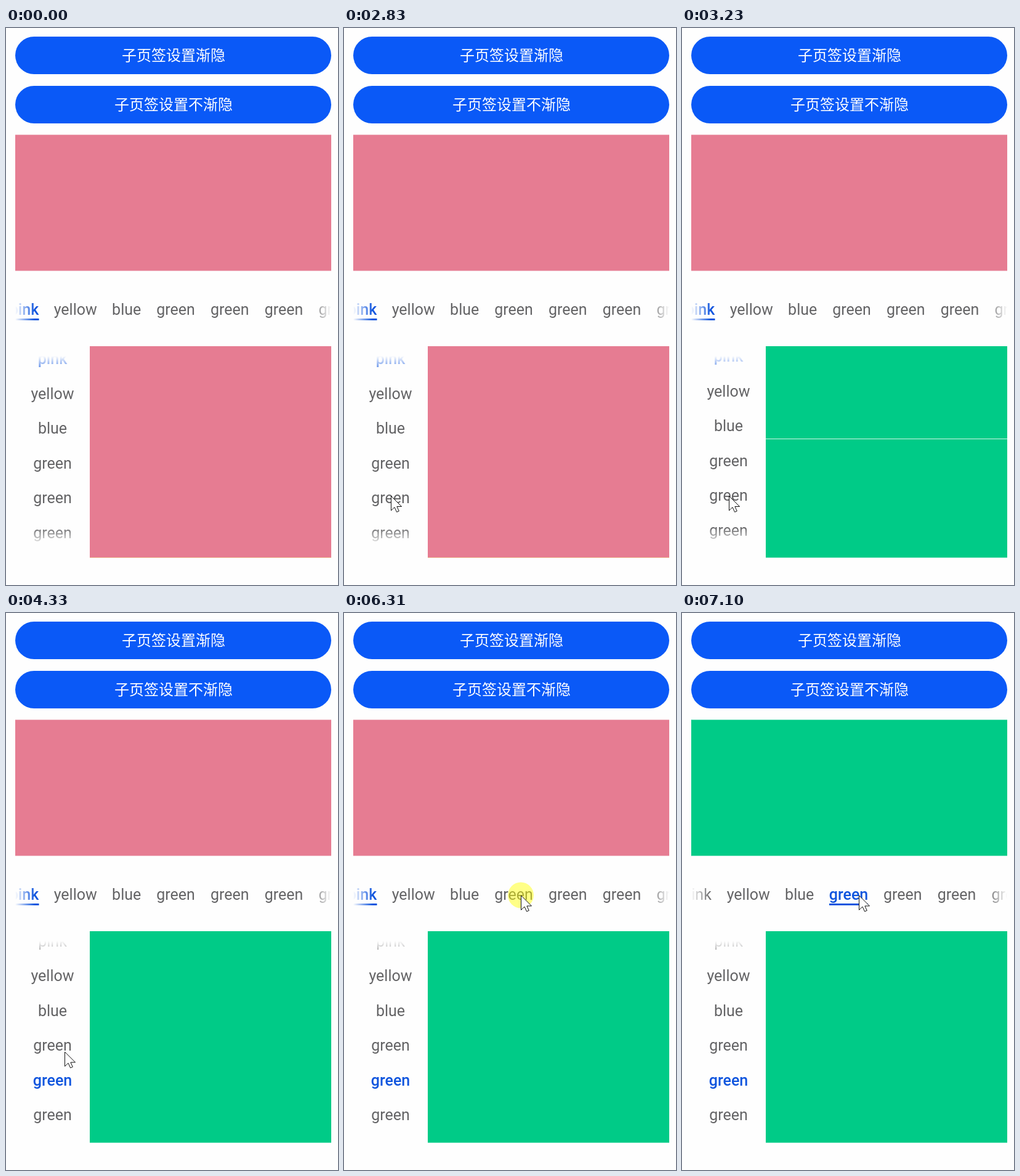
An HTML page with a canvas that plays this animation: 539x905 px, repeating every 8 s.

```html
<!DOCTYPE html>
<html lang="zh">
<head>
<meta charset="utf-8">
<title>Tabs fading edge</title>
<style>
  html, body { margin: 0; height: 100%; overflow: hidden; background: #fefefe; }
  canvas { display: block; width: 539px; height: 905px; }
</style>
</head>
<body>
<canvas id="stage"></canvas>
<script>
const W = 539, H = 905, LOOP = 8000;
const canvas = document.getElementById('stage');
const ctx = canvas.getContext('2d');
const dpr = window.devicePixelRatio || 1;
canvas.width = W * dpr;
canvas.height = H * dpr;

const BG = '#fefefe', GREY = '#646466', ACTIVE = '#0f55de', BUTTON = '#0a59f7';
const GREEN = '#00cb87';
const PAGES = ['#e67c92', '#ffbf00', '#007dff', GREEN, GREEN, GREEN];
const TABS = ['pink', 'yellow', 'blue', 'green', 'green', 'green', 'green'];
const TAB_CENTERS = [29.5, 112.7, 195.7, 275.5, 363.2, 451, 538.7];

// Swipe progress: [time, fraction], each value is held until the next one.
const SIDE_SWIPE = [[0, 0], [3080, 0.47], [3230, 0.89], [3320, 1]];
const TOP_SWIPE = [[0, 0], [6720, 0.567], [6780, 0.77], [7100, 1]];
const SIDE_SELECTED = 3470, TOP_SELECTED = 7100;

// Pointer moves in discrete steps along evenly timed points.
const MOVES = [
  { from: 190, to: 980, steps: 11, path: [[514, 810], [400, 670], [270, 530], [150, 440], [66, 490], [71, 601]] },
  { from: 1060, to: 1290, steps: 4, path: [[71, 618], [71, 651]] },
  { from: 1610, to: 1990, steps: 6, path: [[71, 657], [74, 715], [76, 760]] },
  { from: 4250, to: 5010, steps: 11, path: [[80, 748], [130, 630], [180, 535], [208, 496]] },
  { from: 5080, to: 5850, steps: 11, path: [[241, 487], [291, 471], [318, 464], [327, 459], [305, 458], [287, 458.5]] },
];
const CLICKS = [[2690, 2830], [6310, 6400]];

const held = (keys, t) => keys.filter(([time]) => t >= time).pop()[1];

function pointerAt(t) {
  const move = MOVES.filter(m => t >= m.from).pop();
  if (!move) return null;
  const { from, to, steps, path } = move;
  const step = Math.min(steps - 1, Math.floor((t - from) / (to - from) * (steps - 1)));
  const u = step / (steps - 1) * (path.length - 1);
  const i = Math.min(path.length - 2, Math.floor(u));
  return path[i].map((v, k) => v + (path[i + 1][k] - v) * (u - i));
}

function rect(x, y, w, h, color) {
  ctx.fillStyle = color;
  ctx.fillRect(x, y, w, h);
}

function clipped(x, y, w, h, draw) {
  ctx.save();
  ctx.beginPath();
  ctx.rect(x, y, w, h);
  ctx.clip();
  draw();
  ctx.restore();
}

function roundRect(x, y, w, h, r, color) {
  ctx.fillStyle = color;
  ctx.beginPath();
  ctx.roundRect(x, y, w, h, r);
  ctx.fill();
}

function button(y, label) {
  roundRect(15, y, 513, 61, 30.5, BUTTON);
  ctx.font = '500 24px "Noto Sans CJK SC", "Noto Sans CJK", sans-serif';
  ctx.fillStyle = '#fff';
  ctx.fillText(label, 272, y + 39.3);
}

function tabLabel(text, x, baseline, active) {
  ctx.font = `${active ? 500 : 400} 25px Roboto, sans-serif`;
  ctx.fillStyle = active ? ACTIVE : GREY;
  ctx.fillText(text, x, baseline);
}

// Covers an edge with the background, fading out from (x0, y0) to (x1, y1).
function fade(x0, y0, x1, y1, box) {
  const g = ctx.createLinearGradient(x0, y0, x1, y1);
  g.addColorStop(0, BG);
  g.addColorStop(1, 'rgba(254,254,254,0)');
  rect(...box, g);
}

function topTabs(t) {
  const p = held(TOP_SWIPE, t), selected = t >= TOP_SELECTED ? 3 : 0;
  clipped(15, 173.5, 513, 221, () =>
    PAGES.forEach((color, i) => rect(15 + (i - p * 3) * 513, 173, 513.5, 222, color)));

  clipped(15, 395, 513, 122, () => {
    const scroll = 5 * p;
    if (t >= TOP_SWIPE[1][0] && t < TOP_SELECTED) roundRect(230, 400, 87.5, 116, 8, '#f9f9f9');
    TABS.forEach((text, i) => tabLabel(text, TAB_CENTERS[i] - scroll, 466, i === selected));
    const width = selected ? 63 : 48;
    rect(TAB_CENTERS[selected] - scroll - width / 2, 472, width, 3, ACTIVE);
    fade(15, 0, 47, 0, [15, 395, 32, 122]);
    fade(528, 0, 496, 0, [496, 395, 32, 122]);
  });
}

function sideTabs(t) {
  const p = held(SIDE_SWIPE, t), done = t >= SIDE_SELECTED;
  clipped(136, 517, 392, 343.5, () => {
    rect(136, 517, 392, 344, '#d9f5ea');
    PAGES.forEach((color, i) => rect(136, 517 + (i - p * 4) * 343.5, 392, p % 1 ? 342.5 : 344, color));
  });

  clipped(15, 533, 120, 311, () => {
    for (let i = 0; i < 6; i++)
      tabLabel(TABS[i], 75.5, 546 + 56.5 * i - 4.2 * p, i === (done ? 4 : 0));
    fade(0, 533, 0, 563, [15, 533, 120, 30]);
    if (!done) fade(0, 841, 0, 811, [15, 811, 120, 33]);
  });
}

function pointer(t) {
  const pos = pointerAt(t);
  if (!pos) return;
  ctx.save();
  ctx.translate(...pos);
  if (CLICKS.some(([on, off]) => t >= on && t < off)) {
    ctx.fillStyle = 'rgba(255,255,0,0.47)';
    ctx.beginPath();
    ctx.arc(0, 0, 21, 0, Math.PI * 2);
    ctx.fill();
  }
  ctx.fillStyle = '#fff';
  ctx.strokeStyle = '#111';
  ctx.lineWidth = 1;
  ctx.stroke(new Path2D());
  const arrow = new Path2D('M.5 .5V24L6 18.7 9.6 26.5 13.3 24.9 9.9 17.5H17.5Z');
  ctx.fill(arrow);
  ctx.stroke(arrow);
  ctx.restore();
}

function render(now) {
  const t = now % LOOP;
  ctx.setTransform(dpr, 0, 0, dpr, 0, 0);
  ctx.textAlign = 'center';
  rect(0, 0, W, H, BG);
  button(14, '子页签设置渐隐');
  button(94, '子页签设置不渐隐');
  topTabs(t);
  sideTabs(t);
  pointer(t);
}

const start = performance.now();
function tick() {
  render(performance.now() - start);
  requestAnimationFrame(tick);
}
tick();
</script>
</body>
</html>
```
